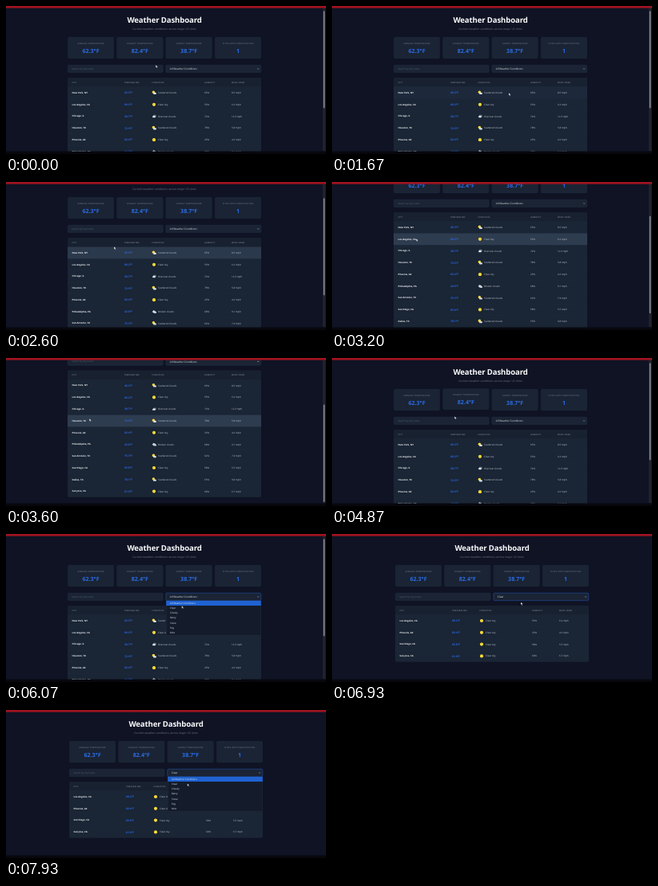
An HTML page that plays this animation: 400 by 186 pixels, repeating every 8000 ms.

```html
<!DOCTYPE html>
<html lang="en">
<head>
<meta charset="utf-8">
<title>Weather Dashboard</title>
<style>
  html, body { margin: 0; width: 100%; height: 100%; overflow: hidden; background: #0f1324; }
  /* Laid out at desktop size, shown at one fifth */
  #screen {
    position: absolute; width: 2000px; height: 930px; overflow: hidden;
    transform: scale(.2); transform-origin: 0 0;
    background: #0f1324; color: #e9edf2;
    font: 15px/20px "Open Sans", "Noto Sans", sans-serif;
    text-rendering: geometricPrecision;
  }
  #screen div, #screen span, #screen svg { position: absolute; box-sizing: border-box; white-space: nowrap; }
  #page { top: 0; left: 0; width: 1980px; height: 1290px; }
  #content { left: 50%; width: 1210px; margin-left: -605px; }
  #title, #subtitle { width: 100%; text-align: center; }
  #title { top: 58px; font-size: 48px; line-height: 60px; font-weight: 700; letter-spacing: -.7px; color: #fafbfc; }
  #subtitle { top: 133px; font-size: 17.2px; line-height: 24px; color: #6b778c; }
  .card {
    top: 195px; width: 290px; height: 135px; text-align: center;
    background: #1a2434; border: 1px solid #222e40; border-radius: 10px;
  }
  .card span { left: 0; width: 100%; }
  .label { top: 27px; font-size: 13px; letter-spacing: 1px; color: #778396; }
  .value { top: 61px; font-size: 35.5px; line-height: 48px; font-weight: 700; color: #2c6be4; }
  .field {
    top: 370px; height: 49px; padding-left: 24px; line-height: 46px;
    background: #1a2434; border: 2px solid #283549; border-radius: 8px;
  }
  #search { left: 0; width: 597px; font-size: 14.5px; color: #566275; }
  #select { left: 613px; width: 597px; font-size: 16px; }
  #select svg { right: 10px; top: 18px; }
  #table { top: 450px; width: 1210px; overflow: hidden; background: #1a2535; border-radius: 10px; }
  #head { width: 100%; height: 58px; background: #182130; }
  #head span { top: 20px; font-size: 12px; letter-spacing: 1px; font-weight: 600; color: #7d899a; }
  .row { width: 100%; height: 74px; border-top: 1px solid #223044; }
  .row span { top: 26px; }
  .city { font-size: 14.4px; font-weight: 700; color: #f2f4f7; }
  .temp { font-size: 16.8px; font-weight: 700; color: #2c6be4; }
  .sky, .wet, .wind { color: #c6cdd6; }
  .row svg { left: 526px; top: 20px; }
  #menu {
    left: 615px; top: 418px; width: 595px; height: 219px;
    background: #141c2b; border: 1px solid #334056;
  }
  #menu div { left: 0; width: 100%; height: 31px; padding-left: 24px; line-height: 31px; }
  #track { left: 1980px; top: 12px; width: 16px; height: 900px; background: #20232d; }
  #thumb { left: 4px; width: 8px; height: 612px; border-radius: 4px; background: #8b8e95; }
  #top { width: 100%; height: 13px; background: #a2131f; }
  #bottom { top: 913px; width: 100%; height: 17px; background: #07080d; }
  #cursor { left: 0; top: 0; }
</style>
</head>
<body>
<div id="screen">
  <div id="page"><div id="content">
    <div id="title">Weather Dashboard</div>
    <div id="subtitle">Current weather conditions across major US cities</div>
    <div id="search" class="field">Search by city name...</div>
    <div id="select" class="field"><span id="choice"></span>
      <svg width="14" height="10"><path d="M2 2l5 5 5-5" fill="none" stroke="#dfe5ec" stroke-width="2.5"/></svg>
    </div>
    <div id="table"><div id="head"></div></div>
    <div id="menu"></div>
  </div></div>
  <div id="track"><div id="thumb"></div></div>
  <div id="top"></div>
  <div id="bottom"></div>
  <svg id="cursor" width="16" height="22"><path d="M1 1v16l4-4 3 7 3-1-3-7h6z" fill="#fff" stroke="#111" stroke-width="1"/></svg>
</div>
<script>
const LOOP = 8000, ROW = 73.9, ROWS_TOP = 508, SCROLL_MAX = 372;
const PICK = 6500;
const $ = id => document.getElementById(id);

function add(parent, tag, className, html, style = {}) {
  const el = document.createElement(tag);
  el.className = className;
  el.innerHTML = html;
  Object.assign(el.style, style);
  parent.append(el);
  return el;
}

const cloud = (x, y, fill) =>
  `<path transform="translate(${x} ${y})" fill="${fill}" d="M5 14a5 5 0 0 1 0-9 6 6 0 0 1 11-1 5 5 0 0 1 2 10z"/>`;
const sun = (x, y, r) => `<circle cx="${x}" cy="${y}" r="${r}" fill="#f7da36"/>`;
const skies = {
  'Clear sky': sun(14, 16, 10.5),
  'Scattered clouds': sun(11, 12, 9) + cloud(7, 12, '#d9dde2'),
  'Overcast clouds': cloud(8, 5, '#626b77') + cloud(2, 10, '#e1e5e9'),
  'Broken clouds': cloud(2, 7, '#e1e5e9') + cloud(8, 12, '#c8ced6')
};

const cities = [
  ['New York, NY', 45.3, 'Scattered clouds', 65, 8.5],
  ['Los Angeles, CA', 68.2, 'Clear sky', 55, 6.2],
  ['Chicago, IL', 38.7, 'Overcast clouds', 72, 12.3],
  ['Houston, TX', 72.5, 'Scattered clouds', 78, 5.8],
  ['Phoenix, AZ', 82.4, 'Clear sky', 25, 4.2],
  ['Philadelphia, PA', 42.8, 'Broken clouds', 68, 9.1],
  ['San Antonio, TX', 75.3, 'Scattered clouds', 62, 7.4],
  ['San Diego, CA', 65.8, 'Clear sky', 58, 5.5],
  ['Dallas, TX', 70.1, 'Scattered clouds', 55, 9.8],
  ['San Jose, CA', 61.9, 'Clear sky', 60, 6.7]
];
const columns = [28, 355, 526, 855, 1025];

const cards = [
  ['AVERAGE TEMPERATURE', '62.3°F'], ['HIGHEST TEMPERATURE', '82.4°F'],
  ['LOWEST TEMPERATURE', '38.7°F'], ['CITIES WITH PRECIPITATION', '1']
].map(([label, value], i) => add($('content'), 'div', 'card',
  `<span class="label">${label}</span><span class="value">${value}</span>`,
  { left: i * 306.6 + 'px' }));

['CITY', 'TEMPERATURE', 'CONDITION', 'HUMIDITY', 'WIND SPEED'].forEach((name, i) =>
  add($('head'), 'span', '', name, { left: columns[i] + 'px' }));

const rows = cities.map(([city, temp, sky, wet, wind]) => {
  const row = add($('table'), 'div', 'row', `<svg width="30" height="32">${skies[sky]}</svg>`);
  const cells = [
    ['city', city], ['temp', temp.toFixed(1) + '°F'], ['sky', sky],
    ['wet', wet + '%'], ['wind', wind.toFixed(1) + ' mph']
  ];
  cells.forEach(([name, text], i) =>
    add(row, 'span', name, text, { left: columns[i] + (i === 2 ? 39 : 0) + 'px' }));
  return row;
});
const allRows = cities.map((_, i) => i);
const clearRows = allRows.filter(i => cities[i][2] === 'Clear sky');

const options = ['All Weather Conditions', 'Clear', 'Cloudy', 'Rainy', 'Snow', 'Fog', 'Mist']
  .map((text, i) => add($('menu'), 'div', '', text, { top: i * 31 + 'px' }));
$('content').append($('menu'));

const pointer = [
  [0, 935, 370], [500, 935, 370], [1640, 1095, 500], [1680, 1105, 552], [2200, 1105, 552],
  [2800, 525, 355], [3200, 525, 355], [3600, 520, 380], [4000, 560, 600], [4330, 640, 560],
  [4650, 745, 290], [4835, 757, 318], [4870, 765, 366], [5400, 1250, 395], [5650, 1250, 395],
  [6070, 1097, 450], [6330, 1080, 468], [6600, 1080, 468], [7050, 1200, 420],
  [7400, 1250, 395], [7600, 1250, 395], [7930, 1132, 461], [8000, 1128, 463]
];
const scrolling = [
  [0, 0], [2300, 0], [2600, 100], [2900, 260], [3200, 260], [3450, SCROLL_MAX],
  [4370, SCROLL_MAX], [4680, 0]
];

// Smooth travel between [time, ...values] points
function follow(points, t) {
  const next = points.findIndex(p => p[0] > t);
  if (next === 0) return points[0].slice(1);
  if (next < 0) return points[points.length - 1].slice(1);
  const a = points[next - 1], b = points[next];
  const u = (t - a[0]) / (b[0] - a[0]), s = u * u * (3 - 2 * u);
  return a.slice(1).map((v, i) => v + (b[i + 1] - v) * s);
}

const menuOpen = t => (t >= 5650 && t < PICK) || t >= 7500;
const shownRows = t => t < PICK ? allRows : clearRows;

function hovered(t) {
  if (menuOpen(t)) return '';
  const [px, py] = follow(pointer, t);
  const x = px - (t < PICK ? 385 : 395), y = py + follow(scrolling, t)[0];
  if (x < 0 || x > 1210) return '';
  if (y > 195 && y < 330) return 'card' + Math.floor(x / 306.6);
  const row = shownRows(t)[Math.floor((y - ROWS_TOP) / ROW)];
  return row === undefined ? '' : 'row' + row;
}

// Averaging the last 150 ms gives the hover transition
function hoverAmounts(t) {
  const amounts = {};
  for (let k = 0; k < 10; k++) {
    const key = hovered(t - k * 15);
    amounts[key] = (amounts[key] || 0) + .1;
  }
  return amounts;
}

function draw(t) {
  const [x, y] = follow(pointer, t), [scroll] = follow(scrolling, t);
  const filtered = t >= PICK, open = menuOpen(t), hover = hoverAmounts(t), shown = shownRows(t);

  $('page').style.width = (filtered ? 2000 : 1980) + 'px';
  $('page').style.transform = `translateY(${-scroll}px)`;
  $('track').style.display = filtered ? 'none' : '';
  $('thumb').style.top = 19 + scroll / SCROLL_MAX * 262 + 'px';
  $('cursor').style.transform = `translate(${x}px, ${y}px)`;

  cards.forEach((card, i) => {
    const a = hover['card' + i] || 0;
    card.style.transform = `translateY(${-6 * a}px)`;
    card.style.boxShadow = `0 6px 12px rgba(0, 0, 0, ${.15 * a})`;
  });

  $('table').style.height = 58 + shown.length * ROW + 'px';
  rows.forEach((row, i) => {
    const place = shown.indexOf(i);
    row.style.display = place < 0 ? 'none' : '';
    row.style.top = 58 + place * ROW + 'px';
    row.style.background = `rgba(66, 82, 105, ${.5 * (hover['row' + i] || 0)})`;
  });

  $('choice').textContent = filtered ? 'Clear' : 'All Weather Conditions';
  $('select').style.borderColor = t >= 5650 ? '#2c6be4' : '';
  $('menu').style.display = open ? '' : 'none';
  const active = (t >= 6180 && t < 7760) ? 1 : 0;
  options.forEach((option, i) => option.style.background = i === active ? '#1f62d2' : '');
}

function tick(now) {
  draw(now % LOOP);
  requestAnimationFrame(tick);
}
draw(0);
requestAnimationFrame(tick);
</script>
</body>
</html>
```
